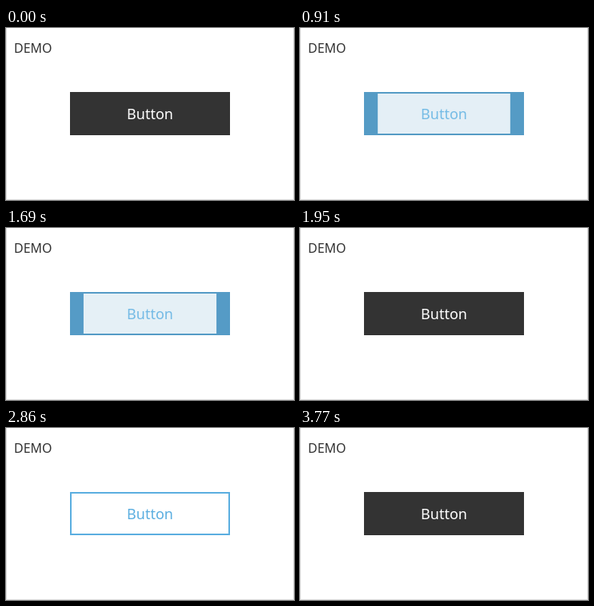
These frames come from a looping animation (360x215 px, 4.68 s). An HTML page:

```html
<!DOCTYPE html>
<html>
<head>
<meta charset="utf-8">
<style>
html, body { margin: 0; width: 100%; height: 100%; overflow: hidden; background: #fff; }
body { font-family: "Noto Sans", "Open Sans", sans-serif; color: #333; }
.card { position: absolute; left: 0; top: 0; width: 358px; height: 214px; border: solid #ddd; border-width: 0 1px 1px; }
.title { position: absolute; left: 10px; top: 14px; font-size: 16px; line-height: 22px; }
.button { position: absolute; left: 80px; top: 80px; width: 200px; height: 54px; font-size: 18px; line-height: 54px; text-align: center; }
.shutter { position: absolute; inset: 2px; background: #fff; }
.label { position: relative; }
</style>
</head>
<body>
<div class="card"></div>
<div class="title">DEMO</div>
<div class="button"><div class="shutter"></div><span class="label">Button</span></div>
<script>
const LOOP = 4680, STEP = 130, DURATION = 300;
const DARK = [51, 51, 51], BLUE = [91, 174, 224], WHITE = [255, 255, 255];
// [start in ms, hovered]
const toggles = [[746, 1], [1650, 0], [2550, 1], [3470, 0]];
const button = document.querySelector(".button");
const shutter = document.querySelector(".shutter");

const bezier = (a, b, u) => 3 * a * u * (1 - u) ** 2 + 3 * b * u * u * (1 - u) + u ** 3;

// CSS "ease": cubic-bezier(.25, .1, .25, 1)
function ease(x) {
  if (x >= 1) return 1;
  let low = 0, high = 1;
  for (let i = 0; i < 24; i++) {
    const mid = (low + high) / 2;
    if (bezier(.25, .25, mid) < x) low = mid; else high = mid;
  }
  return bezier(.1, 1, low);
}

const mix = (from, to, p) => `rgb(${from.map((c, i) => Math.round(c + (to[i] - c) * p))})`;

function hoverAt(time) {
  let hover = 0;
  for (const [start, on] of toggles) {
    if (time < start) break;
    const p = ease((time - start) / DURATION);
    hover = on ? p : 1 - p;
  }
  return hover;
}

function draw(now) {
  const hover = hoverAt(Math.floor((now % LOOP) / STEP) * STEP);
  button.style.background = mix(DARK, BLUE, hover);
  button.style.color = mix(WHITE, BLUE, hover);
  shutter.style.opacity = hover;
  shutter.style.transform = `scaleX(${hover})`;
  requestAnimationFrame(draw);
}
draw(performance.now());
</script>
</body>
</html>
```
